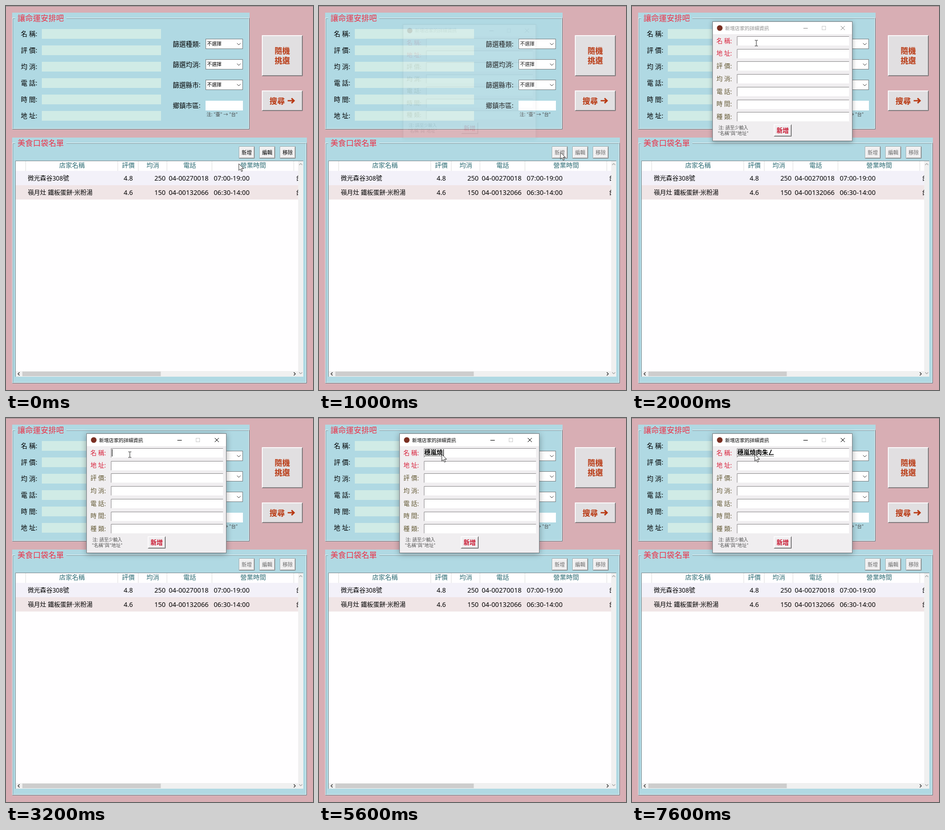
Recreate the animation shown at these times as an HTML page. Size 600 by 750 pixels, loop 8 s.

```html
<!DOCTYPE html>
<html lang="zh-Hant">
<head>
<meta charset="utf-8">
<title>美食口袋名單</title>
<style>
  html, body { margin: 0; width: 100%; height: 100%; overflow: hidden; background: #d8aeb4; }
  svg { display: block; width: 600px; height: 750px; }
  text { font-family: "Noto Sans", "Noto Sans CJK TC", "Noto Sans CJK JP", sans-serif; white-space: pre; }
</style>
</head>
<body>
<svg id="stage" viewBox="0 0 600 750"></svg>
<script>
const LOOP = 8000, STEP = 200;
const BLUE = '#b0d9e3', RUST = '#b8360f', RED = '#ec2f45', TEAL = '#2b6b73';
const MID = ' text-anchor="middle"', END = ' text-anchor="end"';
const REGULAR = ' font-weight="400"', BOLD = ' font-weight="700"';

const rect = (x, y, w, h, fill, extra = '') =>
  `<rect x="${x}" y="${y}" width="${w}" height="${h}" fill="${fill}" ${extra}/>`;
const line = (d, stroke, width = 1, extra = '') =>
  `<path d="${d}" fill="none" stroke="${stroke}" stroke-width="${width}" ${extra}/>`;
// Larger text defaults to medium weight; a weight in extra takes precedence
const text = (x, y, str, size, fill = '#000', extra = '') =>
  `<text x="${x}" y="${y}" font-size="${size}" fill="${fill}" ${extra} font-weight="${size > 11 ? 500 : 400}">${str}</text>`;

// One-pixel frame with separate top-left and bottom-right colours
function edge(x, y, w, h, topLeft, bottomRight) {
  const l = x + .5, t = y + .5, r = x + w - .5, b = y + h - .5;
  return line(`M${l} ${b}V${t}H${r}`, topLeft) + line(`M${l} ${b}H${r}V${t}`, bottomRight);
}

const bevel = (x, y, w, h, fill, topLeft, bottomRight) =>
  rect(x, y, w, h, fill) + edge(x, y, w, h, topLeft, bottomRight);

function panel(x, y, w, h, title) {
  return rect(x, y, w, h, BLUE) +
    edge(x, y + 10, w, h - 10, '#e9f6f9', '#5f7a82') +
    edge(x + 1, y + 11, w - 2, h - 12, '#7f9ca5', '#e9f6f9') +
    rect(x + 6, y + 2, 100, 16, BLUE) +
    text(x + 10.5, y + 15.8, title, 15.1, RED, REGULAR);
}

function combo(y, label) {
  return text(326, y + 4.6, label, 12.7) +
    rect(390.5, y - 9.5, 72, 19, '#fff', 'stroke="#7b8386"') +
    text(393, y + 3.4, '不選擇', 9.4) +
    line(`M451.5 ${y - 1.5}L455 ${y + 2}L458.5 ${y - 1.5}`, '#444');
}

const bigButton = (y, h, content) =>
  bevel(500, y, 80, h, '#e1dfe1', '#fff', '#6c6769') +
  edge(501, y + 1, 78, h - 2, '#f3f1f3', '#a5a1a3') + content;

const smallButton = (x, label) =>
  bevel(x, 274, 31, 24, '#f0eff0', '#a3aeb1', '#7d8486') +
  edge(x + 1, 275, 29, 22, '#fff', '#b4b4b4') +
  text(x + 15.5, 289.6, label, 10, 'currentColor', MID);

function finder() {
  const labels = ['名 稱:', '評 價:', '均 消:', '電 話:', '時 間:', '地 址:'];
  return panel(12, 13, 464, 228, '讓命運安排吧') +
    labels.map((s, i) =>
      text(29, 58.6 + i * 32, s, 12.7) + rect(70, 45 + i * 32, 233, 19, '#d0ebe6')).join('') +
    ['篩選種類:', '篩選均消:', '篩選縣市:'].map((s, i) => combo(74 + i * 40, s)).join('') +
    text(326, 198.6, '鄉鎮市區:', 12.7) + rect(390, 185, 73, 19, '#fff') +
    text(392, 215, '注: "臺" → "台"', 9.1, '#444') +
    bigButton(57, 80,
      text(540, 93, '隨機', 15, RUST, MID + BOLD) + text(540, 112, '挑選', 15, RUST, MID + BOLD)) +
    bigButton(165, 40,
      text(515, 190.5, '搜尋', 15, RUST, BOLD) +
      line('M550.5 185H562M558 180.2L563 185L558 189.8', RUST, 2.7));
}

function row(y, fill, name, score, cost, phone, hours) {
  const b = y + 18.5;
  return rect(19, y, 552, 28, fill) + text(42.5, b, name, 12.05) +
    text(239, b, score, 12.6, '#000', MID) + text(312, b, cost, 12.9, '#000', END) +
    text(318, b, phone, 12.9) + text(406, b, hours, 12.9) +
    text(566.5, b, '台', 12.05, '#000', 'clip-path="url(#table)"');
}

function list() {
  const heads = [['店家名稱', 129], ['評價', 239], ['均消', 287], ['電話', 359], ['營業時間', 483]];
  return panel(12, 257, 576, 480, '美食口袋名單') +
    `<g id="tools">${smallButton(455, '新增')}${smallButton(495, '編輯')}${smallButton(535, '移除')}</g>` +
    rect(18, 302, 563, 422, '#fffeff') +
    heads.map(([s, x]) => text(x, 316.2, s, 12.5, TEAL, MID + REGULAR)).join('') +
    [38.5, 218.5, 258.5, 314.5, 402.5, 562.5].map(x => line(`M${x} 303V322`, '#e0e0e0')).join('') +
    row(322, '#f3f1f9', '微光森谷308號', '4.8', '250', '04-00270018', '07:00-19:00') +
    row(350, '#f0e5e6', '嶺月灶 鐵板蛋餅·米粉湯', '4.6', '150', '04-00132066', '06:30-14:00') +
    rect(571, 303, 10, 421, '#f0f0f0') + rect(19, 713, 562, 11, '#f0f0f0') +
    rect(32, 714, 270.5, 9, '#cdcdcd') +
    line('M26.5 715.5L23.5 718.5L26.5 721.5M562.5 715.5L565.5 718.5L562.5 721.5', '#333', 1.4) +
    line('M573 310.5L576 307.5L579 310.5M573 715.5L576 718.5L579 715.5', '#a8a8a8', 1.2) +
    line('M18.5 724V302.5H581', '#7d8c91');
}

function dialog() {
  const labels = ['名 稱:', '地 址:', '評 價:', '均 消:', '電 話:', '時 間:', '種 類:'];
  return rect(158, 31, 273, 233, '#f0eef0') + rect(158, 31, 273, 24, '#fff') +
    rect(157.5, 30.5, 273, 233, 'none', 'stroke="#7d8286"') +
    '<circle cx="171.5" cy="43" r="5.5" fill="#7a2f22"/>' +
    `<g id="titlebar">${text(182, 46.6, '新增店家的詳細資訊', 9.55, 'currentColor')}
      ${line('M335 43.5H343.5M408 39L416 47M416 39L408 47', 'currentColor')}</g>` +
    rect(371.5, 39.5, 7, 7, 'none', 'stroke="#ccc"') +
    labels.map((s, i) => {
      const y = 68.3 + i * 24.7;
      return text(165, y + 4.4, s, 12, i < 2 ? '#d8203a' : '#645a35') +
        bevel(205, Math.round(y - 9.3), 220, 19, '#fff', '#8f8d8f', '#f4f2f4');
    }).join('') +
    text(169, 240.6, '注: 請至少輸入', 8.9, '#555') + text(168, 251.8, '"名稱"與"地址"', 9, '#555') +
    bevel(277, 231, 35, 24, '#f0eef0', '#fff', '#6a6a6a') +
    edge(278, 232, 33, 22, '#f8f6f8', '#a5a3a5') +
    text(294.5, 247.5, '新增', 12, '#c8142e', MID + BOLD) +
    text(206, 72, '', 12, '#000', 'id="typed"' + BOLD) +
    line('', '#000', 1, 'id="underline" stroke-dasharray="1 1"') + line('', '#000', 1, 'id="caret"');
}

const $ = id => document.getElementById(id);
$('stage').innerHTML =
  '<clipPath id="table"><rect x="19" y="303" width="552" height="410"/></clipPath>' +
  rect(0, 0, 600, 750, '#d8aeb4') + rect(0, 0, 600, 1, '#91898b') + finder() + list() +
  `<g id="dialog">${dialog()}</g>
  <path id="arrow" d="M0 0V13.2L3 10.4L5.2 15.3L7.3 14.4L5.2 9.6H9.4Z" fill="#fff" stroke="#222" stroke-width=".9"/>
  <path id="beam" d="M-3 -5.5H-.8L0 -5L.8 -5.5H3M0 -5V5M-3 5.5H-.8L0 5L.8 5.5H3" fill="none" stroke="#333"/>`;

// [time, x, y, shape]
const pointer = [
  [0, 455, 308, 'arrow'], [200, 464, 297, 'arrow'], [400, 472, 286, 'arrow'],
  [1400, 452, 262, 'arrow'], [1600, 352, 143, 'beam'], [1800, 268, 88, 'beam'],
  [2000, 243, 72.5, 'beam'], [3000, 242, 71.5, 'beam'], [5400, 240, 71, 'arrow']
];
// [time, input text, caret visible]
const typing = [
  [0, '', 0], [3000, '', 1], [3400, '', 0], [3800, 'ㄙ', 0], [4000, 'ㄙㄨ', 0], [4400, '穗', 0],
  [4600, '穗ㄌ', 0], [4800, '穗ㄌㄢ', 0], [5000, '穗嵐', 0], [5200, '穗嵐ㄕ', 0],
  [5400, '穗嵐ㄕㄠ', 0], [5600, '穗嵐燒', 1], [5800, '穗嵐燒ㄖ', 0], [6000, '穗嵐燒肉', 0],
  [6400, '穗嵐燒肉ㄓ', 0], [6600, '穗嵐燒肉ㄓㄨ', 0], [6800, '穗嵐燒肉朱', 0],
  [7000, '穗嵐燒肉朱ㄥ', 1], [7600, '穗嵐燒肉朱ㄥ', 0]
];
const at = (keys, t) => keys.findLast(key => key[0] <= t);

function render(time) {
  const t = Math.floor(time % LOOP / STEP) * STEP;
  const active = t >= 3000;

  const [opacity, scale] = t < 1000 ? [0, 1] : t < 1200 ? [.13, .952] : t < 1400 ? [.92, .995] : [1, 1];
  $('dialog').setAttribute('opacity', opacity);
  $('dialog').setAttribute('transform',
    `translate(294.5 147.5) scale(${scale}) translate(-294.5 -147.5)`);
  $('dialog').style.filter = `drop-shadow(0 2px ${active ? 6 : 4}px rgba(0,0,0,.33))`;
  $('tools').setAttribute('color', t < 1000 ? '#000' : '#6d6d6d');
  $('titlebar').setAttribute('color', active ? '#000' : '#8c8c8c');

  const [, str, caret] = at(typing, t);
  const end = 206 + str.length * 12;
  $('typed').textContent = str;
  $('underline').setAttribute('d', str ? `M206 74.5H${end}` : '');
  $('caret').setAttribute('d', caret ? `M${end + 1.5} 61V75` : '');

  const [, x, y, shape] = at(pointer, t);
  for (const id of ['arrow', 'beam']) {
    $(id).setAttribute('visibility', id === shape ? 'visible' : 'hidden');
    $(id).setAttribute('transform', `translate(${x} ${y})`);
  }
}

const start = performance.now();
function tick() {
  render(performance.now() - start);
  requestAnimationFrame(tick);
}
tick();
</script>
</body>
</html>
```
